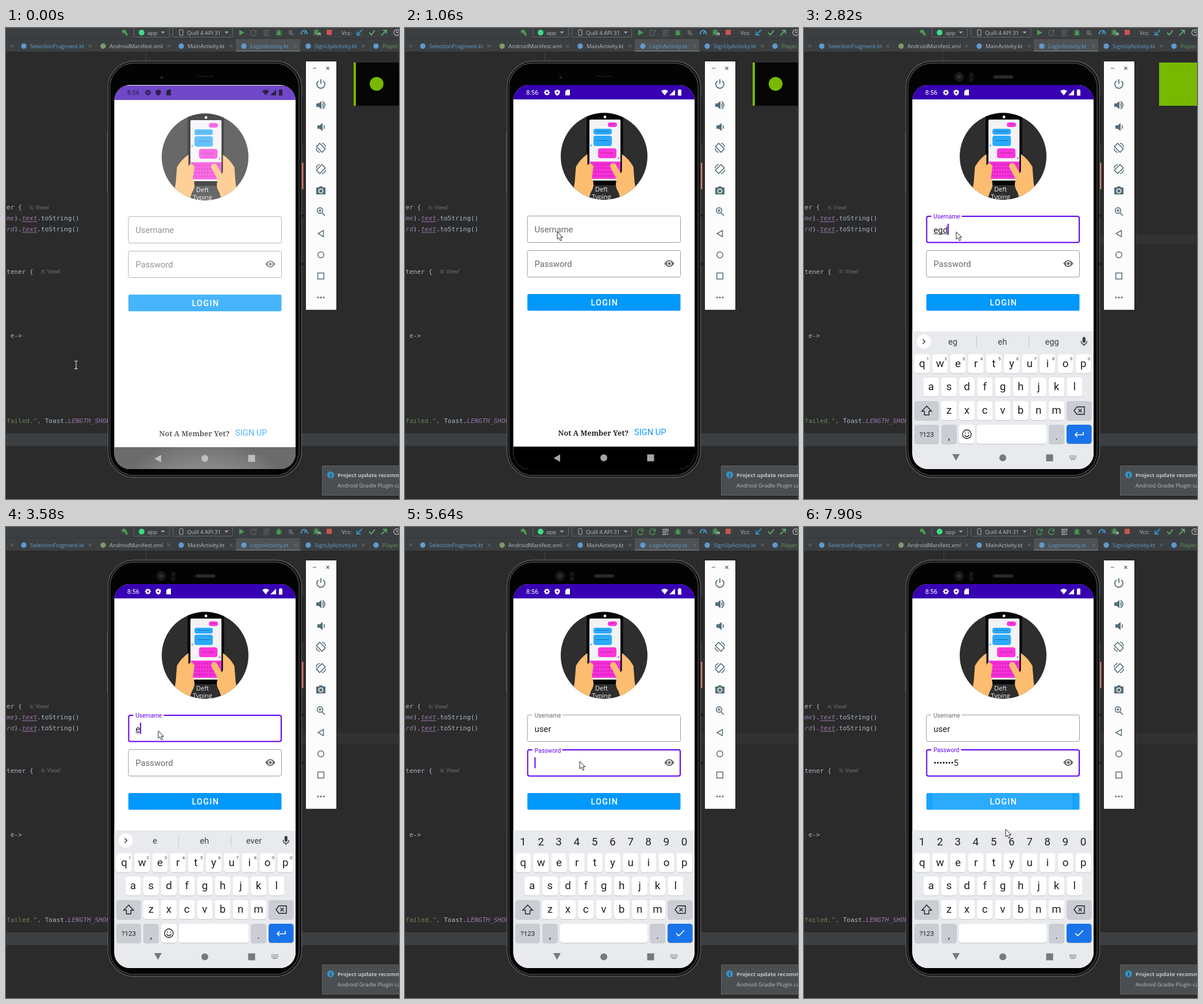
An HTML page with a canvas for the animation above (8000 ms loop, 684 by 818 pixels).

```html
<!DOCTYPE html>
<html lang="en">
<head>
<meta charset="utf-8">
<title>Login screen</title>
<style>
html, body { margin: 0; width: 100%; height: 100%; overflow: hidden; background: #2b2b2b; }
canvas { display: block; }
</style>
</head>
<body>
<canvas id="c" width="684" height="818"></canvas>
<script>
const ctx = document.getElementById('c').getContext('2d');
const LOOP = 8000;
const UI = '"Open Sans", "Noto Sans", sans-serif';
const MONO = '"DejaVu Sans Mono", monospace';
const APP = 'Roboto, sans-serif';
const PURPLE = '#6200ee', SLATE = '#546e7a', GREEN = '#499c54', DIM = '#5e6163';

// ---- helpers ----
function rect(x, y, w, h, fill) {
  ctx.fillStyle = fill;
  ctx.fillRect(x, y, w, h);
}
function box(x, y, w, h, r, fill, stroke, lw = 1) {
  ctx.beginPath();
  ctx.roundRect(x, y, w, h, r);
  paint(fill, stroke, lw);
}
function disc(x, y, r, fill, stroke, lw = 1) {
  ctx.beginPath();
  ctx.arc(x, y, r, 0, 7);
  paint(fill, stroke, lw);
}
function paint(fill, stroke, lw) {
  if (fill) { ctx.fillStyle = fill; ctx.fill(); }
  if (stroke) { ctx.strokeStyle = stroke; ctx.lineWidth = lw; ctx.stroke(); }
}
function icon(x, y, d, fill, stroke, lw = 1.4, turn = 0) {
  const p = new Path2D(d);
  ctx.save();
  ctx.translate(x, y);
  ctx.rotate(turn);
  if (fill) { ctx.fillStyle = fill; ctx.fill(p); }
  if (stroke) { ctx.strokeStyle = stroke; ctx.lineWidth = lw; ctx.stroke(p); }
  ctx.restore();
}
function text(s, x, y, font, color, align = 'left', spacing = 0) {
  ctx.font = font;
  ctx.fillStyle = color;
  ctx.textAlign = align;
  ctx.letterSpacing = spacing + 'px';
  ctx.fillText(s, x, y);
  const w = ctx.measureText(s).width;
  ctx.letterSpacing = '0px';
  return w;
}
// Value of the last [time, value] key reached.
function at(keys, t) {
  let v = keys[0][1];
  for (const k of keys) if (t >= k[0]) v = k[1];
  return v;
}
const within = (t, a, b) => t >= a && t < b;

// ---- timeline ----
const nameKeys = [[0, ''], [2430, 'e'], [2670, 'eg'], [2820, 'egd'], [3460, 'eg'], [3580, 'e'],
  [3730, ''], [4280, 'u'], [4430, 'use'], [4550, 'user']];
const hintKeys = [[0, ''], [2550, 'e eh ever'], [2820, 'eg eh egg'], [2940, 'egd egg edge'],
  [3460, 'eg eh egg'], [3580, 'e eh ever'], [3850, ''], [4280, 'u up us'], [4430, 'us use up'],
  [4550, 'use used uses'], [4830, 'user users used']];
const passKeys = [[0, ''], [5940, 'a'], [6060, 'ab'], [6210, 'abc'], [6330, 'abc1'], [6450, 'abc123'],
  [6750, 'abc1234'], [6870, 'abc12345']];
// Pointer moves: start, end, steps, x, y
const moves = [[460, 1060, 6, 265, 354], [5100, 5100, 1, 268, 354], [5250, 5370, 2, 304, 407],
  [6600, 6600, 1, 304, 425], [6750, 6750, 1, 304, 453], [6870, 7230, 4, 335, 484], [7900, 7900, 1, 351, 525]];

function pointer(t) {
  let x = 122, y = 585;
  for (const [a, b, n, x1, y1] of moves) {
    if (t < a) break;
    const step = n > 1 ? Math.min(n, 1 + Math.floor((t - a) / (b - a) * (n - 1))) : 1;
    x += (x1 - x) * step / n;
    y += (y1 - y) * step / n;
  }
  return [x, y];
}

// ---- IDE ----
const ARROW = 'M-3.5-2L0 2L3.5-2Z', CROSS = 'M-2.5-2.5L2.5 2.5M2.5-2.5L-2.5 2.5';
const RELOAD = 'M3.5-3A5 5 0 1 0 4.5 2M4.5-5V-1H.5';

function bug(x, y, c) {
  ctx.beginPath();
  ctx.ellipse(x, y + 1, 3, 4, 0, 0, 7);
  paint(c);
  icon(x, y, 'M-5-3L-2-1M5-3L2-1M-5.5 1H5.5M-5 5L-2 3M5 5L2 3M-2-5L0-3L2-5', null, c, 1.1);
}
function toolbar(t) {
  rect(0, 0, 684, 19, '#3c3f41');
  icon(206, 8, 'M-5-2L-1-6L3-3L6 4L4 6L-1 0L-3 1Z', GREEN);
  box(222.5, -4, 62, 20, 3, '#3c3f41', '#646769');
  disc(236, 8, 5, '#3ddc84');
  text('app', 246, 12, '9.8px ' + UI, '#bbb');
  icon(273, 8, ARROW, '#9da0a2');
  box(290.5, -4, 104, 20, 3, '#3c3f41', '#646769');
  box(302, 3, 6, 10, 1, null, '#afb1b3');
  text('Quill 4 API 31', 315, 12, '9.6px ' + UI, '#bbb');
  icon(384, 8, ARROW, '#9da0a2');
  const running = t >= 4830;
  if (running) icon(410, 8, RELOAD, null, GREEN);
  else icon(410, 8, 'M-4-5L5 0L-4 5Z', GREEN);
  icon(431, 8, RELOAD, null, running ? GREEN : DIM);
  icon(453, 8, 'M-5-4H6M-5-1H6M-5 2H2M-5 5H2M4 2V6', null, running ? '#afb1b3' : DIM);
  bug(475, 8, GREEN);
  icon(497, 8, 'M-5-4H1V3L-2 5L-5 2ZM1 0L5 3L1 6Z', DIM);
  icon(519, 8, 'M-5 3A5.2 5.2 0 1 1 5 3M0 2L3-2', null, '#4a9fd0', 1.8);
  bug(540, 7, GREEN);
  icon(545, 11, 'M-3 2L2-2M2 2V-2H-2', null, '#afb1b3');
  rect(558, 3, 9, 9, '#c75450');
  text('Vcs:', 584, 12, '9.6px ' + UI, '#bbb');
  icon(615, 8, 'M5-5L-4 4M-4-2V4H2', null, '#3592c4', 1.8);
  icon(637, 8, 'M-5 0L-1 4L5-4', null, '#59a869', 2);
  icon(658, 8, 'M-5 5L4-4M4 2V-4H-2', null, '#59a869', 1.8);
  disc(680, 8, 5, null, '#afb1b3', 1.3);
  icon(680, 8, 'M0-3V0H3', null, '#afb1b3');
}
function tabs() {
  rect(0, 18, 684, 1, '#323232');
  rect(0, 19, 684, 22, '#3c3f41');
  rect(400, 19, 112, 22, '#4e5254');
  rect(400, 39, 112, 2, '#686d71');
  icon(10, 31.5, CROSS, null, '#777', 1);
  const blue = '#5f9fce', grey = '#bbb';
  const list = [[31, 'SelectionFragment.kt', blue, 146], [169, 'AndroidManifest.xml', grey, 283],
    [305, 'MainActivity.kt', grey, 392], [414, 'LoginActivity.kt', blue, 504],
    [526, 'SignUpActivity.kt', blue, 622], [644, 'Player.kt', '#629755', 720]];
  for (const [x, name, color, close] of list) {
    disc(x, 31.5, 4.7, name.endsWith('kt') ? '#5f9ad0' : '#7f9a6a');
    text(name, x + 11, 35, '9.55px ' + UI, color);
    icon(close, 31.5, CROSS, null, '#777', 1);
  }
}
function code() {
  const font = '11.08px ' + MONO, plain = '#a9b7c6', field = '#9876aa', it = 'italic ' + font;
  const run = (y, parts) => {
    let x = 1;
    for (const [s, color, f] of parts) x += text(s, x, y, f || font, color);
  };
  run(315, [['er {', plain]]);
  run(427, [['tener {', plain]]);
  text('it: View!', 41, 315, '9.5px ' + UI, '#787878');
  text('it: View!', 61, 426, '9.5px ' + UI, '#787878');
  [['me', 334], ['rd', 352.5]].forEach(([s, y]) => {
    run(y, [[s, field, it], [').', plain], ['text', field, it], ['.toString()', plain]]);
    rect(28, y + 2, 26, 1, field);
  });
  run(538, [[' e->', plain]]);
  run(686, [['failed."', '#6a8759'], [', ', '#cc7832'], ['Toast.', plain], ['LENGTH_SHORT', field, it]]);
}
function ide(t) {
  rect(0, 0, 684, 818, '#2b2b2b');
  rect(243, 42, 1, 20, '#424242');
  if (t >= 2430) rect(516, 358, 168, 18, '#323232');
  code();
  rect(0, 704, 684, 22, '#3c3f41');
  toolbar(t);
  tabs();
  box(550.5, 760.5, 150, 51, 0, '#4b4e50', '#5e6264');
  disc(565, 776, 6, '#3592c4');
  text('i', 565, 779.5, 'bold 9px ' + UI, '#2b2b2b', 'center');
  text('Project update recommended', 577, 780, 'bold 9.4px ' + UI, '#c4c4c4');
  text('Android Gradle Plugin can be', 577, 798, '9.5px ' + UI, '#bbb');
}
function overlayPanel(t) {
  if (t >= 3060) return;
  const x = at([[0, 605], [2670, 608], [2820, 618], [2940, 642]], t);
  const w = at([[0, 4], [2430, 40], [2550, 90]], t);
  rect(x, 60, 80, 75, '#060606');
  disc(645, 97, 12, '#76b900');
  rect(x, 60, w, 75, '#76b900');
}

// ---- emulator ----
function sidebar() {
  rect(521.5, 57, 54.5, 434, '#1c1c1c');
  rect(522, 58, 53, 431.5, '#fcfcfc');
  icon(537, 70, 'M-3 0H3', null, '#555', 1);
  icon(560, 70, CROSS, null, '#555', 1.1);
  const x = 548, s = SLATE;
  icon(x, 97, 'M-4-5A7 7 0 1 0 4-5M0-8V0', null, s, 1.8);
  const speaker = 'M-8-3H-4L1-7V7L-4 3H-8Z';
  icon(x, 134, speaker, s);
  icon(x, 134, 'M3-3Q5 0 3 3M3-6.5Q11 0 3 6.5', null, s, 1.7);
  icon(x + 2, 172, speaker, s);
  icon(x + 2, 172, 'M3-3Q5.5 0 3 3', null, s, 1.7);
  for (const [y, k] of [[208, 1], [245, -1]]) {
    icon(x, y, 'M-4-7H4V7H-4Z', null, s, 1.6, -k * Math.PI / 4);
    icon(x, y, k > 0 ? 'M2-8Q8-7 8-1M-8 1Q-8 7-2 8' : 'M-2-8Q-8-7-8-1M8 1Q8 7 2 8', null, s, 1.4);
  }
  icon(x, 282, 'M-8-5H-4L-2-7H2L4-5H8V7H-8Z', s);
  disc(x, 283, 3.6, s, '#fff', 1.5);
  disc(x - 1.5, 317, 4.8, null, s, 1.7);
  icon(x, 319, 'M2 2L7 7M-4-2H1M-1.5-4.5V.5', null, s, 1.7);
  icon(x, 357, 'M4.5-5.5V5.5L-5 0Z', null, s, 1.5);
  disc(x, 394, 5.3, null, s, 1.5);
  box(x - 5.3, 425.5, 10.6, 10.6, 0, null, s, 1.5);
  for (const dx of [-5, 0, 5]) disc(x + dx, 468, 1.6, s);
}
function shell(t) {
  rect(514, 234, 3.5, 46, '#d47c66');
  rect(515, 120, 2, 80, '#161616');
  rect(515, 324, 2, 4, '#000');
  rect(515, 408, 2, 4, '#000');
  rect(175.5, 182, 2, 104, '#444');
  box(177.5, 57.5, 337, 723, 46, '#111', '#5d5d5d', 1.3);
  box(181, 61, 329, 716, 42, '#030303', '#4a4a4a', 1.3);
  if (t >= 2550) {
    disc(270, 85, 7.5, '#191919', '#242424');
    disc(270, 85, 3, '#303030');
    box(287, 77, 8, 17, 4, '#111');
    disc(291, 81, 2, '#1d1d1d');
    disc(291, 90, 2, '#1d1d1d');
    box(329, 82, 35, 6, 3, '#222');
    for (let x = 333; x < 362; x += 4) rect(x, 83, 2, 4, '#333');
  } else {
    disc(271, 86, 2.5, '#222');
    for (let x = 334; x < 362; x += 4) rect(x, 83, 2, 2, '#292929');
  }
}

// ---- app ----
function statusIcons(c) {
  text('8:56', 211, 116, '11px ' + APP, c);
  cog(247, 112, 4.5, c);
  icon(265, 112, 'M0-5L4.5-3V0Q4 4 0 5.5Q-4 4-4.5 0V-3Z', c);
  disc(265, 112, 1.6, '#3700b3');
  icon(283, 112, 'M-1-5H4V5H-4V-2Z', c);
  icon(452, 112, 'M-6-2.5Q0-7 6-2.5L0 5Z', c);
  icon(465, 112, 'M5-5V5H-5Z', c);
  icon(478, 112, 'M-1.5-5.5H1.5V-4.5H3V5.5H-3V-4.5H-1.5Z', c);
}
function cog(x, y, r, c) {
  disc(x, y, r * .62, null, c, r * .45);
  for (let i = 0; i < 8; i++) {
    icon(x, y, `M0 ${-r * .7}V${-r * 1.12}`, null, c, r * .4, i * Math.PI / 4);
  }
}
function logo() {
  ctx.save();
  ctx.beginPath();
  ctx.arc(346.5, 223, 75.5, 0, 7);
  ctx.clip();
  rect(270, 147, 154, 152, '#2e2e2e');
  box(316, 140, 63.5, 133, 7, '#050505');
  disc(348, 154.5, 2.4, '#eee');
  box(321, 159, 54, 106, 2, '#f3f3f6');
  const pink = '#fb35dc', blue = '#2ba9fb';
  const bubbles = [[353, 164, 16, 8, pink], [328, 175, 32, 10, blue], [328, 187, 32, 18, blue], [336, 209, 32, 17, pink]];
  for (const [x, y, w, h, c] of bubbles) {
    box(x, y, w, h, 4, c);
    rect(x + 5, y + h / 2 - 1, w - 10, 1, '#0005');
  }
  disc(324, 204, 1.5, blue);
  disc(372, 226, 1.5, pink);
  rect(322, 232, 53, 30, pink);
  for (let r = 0; r < 4; r++) {
    for (let i = 0; i < 10; i++) rect(325 + i * 4.8, 235 + r * 6.5, 3.4, 4, '#e024c6');
  }
  const skin = '#fdbd70';
  const hand = 'M-30-4Q-42 4-50 18L-52 44L-58 84H-31L-24 62Q-16 50-22 38L-30 26Z';
  ctx.lineCap = 'round';
  for (const [k, thumb] of [[1, 'M-29 46L-25 18'], [-1, 'M-29 43L-15 17']]) {
    ctx.save();
    ctx.translate(347.5, 223);
    ctx.scale(k, 1);
    icon(0, 0, hand, skin);
    icon(0, 0, thumb, null, skin, 11);
    ctx.restore();
  }
  text('Deft', 342, 284, '11px ' + UI, '#f2f2f2', 'center');
  text('Typing', 342, 296.5, '11px ' + UI, '#f2f2f2', 'center');
  ctx.restore();
}
// Outlined input; rise is how far the label has floated.
function input(y, label, rise, focus) {
  if (focus) box(213.5, y + 1, 265.5, 45.5, 3, null, PURPLE, 2);
  else box(213, y + .5, 266.5, 46, 3, null, '#999');
  if (rise > .5) rect(221.5, y - 1, label === 'Username' ? 53 : 52, 4, '#fff');
  const size = 14.75 - 4.6 * rise;
  text(label, 225.5, y + 28.5 - 23.7 * rise, size + 'px ' + APP, focus ? PURPLE : '#6a6a6a');
}
function caret(x, y) {
  rect(x, y, 2, 19, PURPLE);
}
function form(t) {
  const font = '14.8px ' + APP, onPass = t >= 5520;
  const name = at(nameKeys, t), pass = at(passKeys, t);
  input(326, 'Username', at([[0, 0], [1330, .5], [1450, 1]], t), within(t, 1330, 5520));
  const w = text(name, 225.5, 355.5, font, '#1c1c1c');
  if (within(t, 1330, 5520)) {
    if (name) rect(225.5, 357, w, 1, '#333');
    if (!within(t, 2280, 2430) && !within(t, 4950, 5250)) caret(225.3 + w, 340);
  }
  input(386, 'Password', at([[0, 0], [5520, .5], [5640, .95], [5790, 1]], t), onPass);
  const shown = '•'.repeat(Math.max(0, pass.length - 1)) + pass.slice(-1);
  const pw = text(shown, 225.5, 415, font, '#1c1c1c');
  if (within(t, 5640, 7630)) caret(225.3 + pw, 400);
  icon(460, 409, 'M-8.8 0Q0-12 8.8 0Q0 12-8.8 0Z', '#6c6c6c');
  disc(460, 409, 3.3, '#6c6c6c', '#fff', 1.5);
  button(t);
}
function button(t) {
  ctx.save();
  box(213, 462, 266.5, 29, 2.5, '#0098fa');
  ctx.clip();
  if (t >= 7630) {
    rect(213, 462, 267, 29, 'rgba(255,255,255,.1)');
    disc(345, 477, at([[0, 50], [7750, 90], [7900, 122]], t), 'rgba(255,255,255,.08)');
  }
  ctx.restore();
  text('LOGIN', 347.3, 482.2, '500 14.3px ' + APP, '#fff', 'center', 1.3);
}

// ---- keyboard ----
function key(x, y, w, fill = '#fff') {
  box(x, y - 15.5, w, 33, 4.5, '#c3c5c9');
  box(x, y - 16.5, w, 33, 4.5, fill);
}
function keyRow(chars, x, y, sup) {
  [...chars].forEach((ch, i) => {
    const cx = x + i * 31.2;
    key(cx - 13.5, y, 27);
    text(ch, cx, y + 5.5, '18.8px ' + APP, '#202124', 'center');
    if (sup) text((i + 1) % 10, cx + 10, y - 6.5, '8px ' + APP, '#3c4043', 'center');
  });
}
function strip(t, y) {
  const ink = '#3c4043', words = at(hintKeys, t);
  disc(208.5, y, 12.3, '#fff');
  icon(208.5, y, words ? 'M-2-4L2 0L-2 4' : 'M2-4L-2 0L2 4', null, ink, 1.6);
  box(484.7, y - 8, 5.2, 10, 2.6, ink);
  icon(487.3, y, 'M-5-1Q-5 5 0 5Q5 5 5-1M0 5V8', null, ink, 1.5);
  if (words) {
    words.split(' ').forEach((s, i) => text(s, 259 + i * 86.3, y + 5.5, '14.6px ' + APP, ink, 'center'));
    rect(300, y - 10, 1, 20, '#c6c8cc');
    rect(391, y - 10, 1, 20, '#c6c8cc');
    return;
  }
  icon(250, y, 'M-6-6H6V2L2 6H-6ZM6 2H2V6M-3 0Q0 4 3 0M-3-3V-2M3-3V-2', null, ink, 1.5);
  text('GIF', 295, y + 4, 'bold 11px ' + APP, ink, 'center', .4);
  icon(341, y, 'M-5.5-6H5.5V7H-5.5ZM-2-8H2V-4H-2ZM-3-1H3M-3 2H3M-3 4.5H1', null, ink, 1.4);
  cog(386, y, 6.2, ink);
  rect(414, y - 10, 1, 20, '#c6c8cc');
  for (const dx of [-5, 0, 5]) disc(442.5 + dx, y, 1.7, ink);
}
function keyboard(t) {
  const off = t < 1850 ? 9 : 0, secret = t >= 5640, grey = '#cbcdd4', ink = '#202124';
  rect(188, 527 + off, 317, 245, '#e8eaed');
  if (secret) {
    [...'1234567890'].forEach((d, i) => text(d, 205.3 + i * 31.2, 552.5, '19px ' + APP, ink, 'center'));
  } else strip(t, 544.5 + off);
  const y = 583 + off, y3 = y + 81.5, y4 = y + 122.5;
  keyRow('qwertyuiop', 205.5, y, !secret);
  keyRow('asdfghjkl', 221.2, y + 40.5);
  keyRow('zxcvbnm', 252.3, y3);
  key(192, y3, 43, grey);
  icon(213.5, y3, 'M0-8L8.5 1H4V7.5H-4V1H-8.5Z', null, ink);
  key(457, y3, 43.5, grey);
  icon(479, y3, 'M-9 0L-4-6.5H9V6.5H-4ZM-1.5-3L4.5 3M4.5-3L-1.5 3', null, ink);
  key(192, y4, 43, grey);
  text('?123', 213.5, y4 + 4.5, '11.7px ' + APP, ink, 'center');
  key(239, y4, 27, grey);
  text(',', 252.5, y4 + 9, '17px ' + APP, ink, 'center');
  if (!secret) {
    key(270, y4, 27);
    disc(283.5, y4, 7.5, null, ink, 1.4);
    icon(283.5, y4, 'M-4 1.5Q0 7 4 1.5M-2.8-3V-1M2.8-3V-1', null, ink);
  }
  key(secret ? 270 : 301, y4, secret ? 152 : 121);
  key(426, y4, 27, grey);
  text('.', 439.5, y4 + 9, '17px ' + APP, ink, 'center');
  key(457, y4, 43.5, '#1a73e8');
  icon(479, y4, secret ? 'M-7 0L-2.5 4.5L7-5' : 'M7-4V1H-7M-3-3.5L-7 1L-3 5', null, '#fff', 1.7);
}
function navBack(t) {
  if (t >= 150) return '#000';
  const g = ctx.createRadialGradient(346, 900, 130, 346, 900, 190);
  g.addColorStop(0, '#626262');
  g.addColorStop(1, '#333');
  return g;
}
function navBar(t) {
  const open = t >= 1730, c = open ? '#77797c' : '#a5a5a5';
  if (!open) rect(188, 727, 317, 45, navBack(t));
  const turn = at([[0, 0], [1730, Math.PI], [1850, -Math.PI / 2]], t);
  icon(within(t, 1730, 1850) ? 266 : 264.5, open ? 745.5 : 747, 'M-6 0L5.5-6.5V6.5Z', c, null, 1, turn);
  disc(346, 746.5, 6, c);
  rect(421.5, 740.5, 12, 12, c);
  if (!open) return;
  for (let r = 0; r < 2; r++) for (let i = 0; i < 5; i++) rect(462 + i * 2.6, 742.5 + r * 3, 1.6, 1.8, c);
  rect(464, 748.5, 8, 1.3, c);
}
function screen(t) {
  const entering = t < 150;
  ctx.save();
  ctx.beginPath();
  ctx.roundRect(188.5, 99, 315.5, 667, 27);
  ctx.clip();
  rect(188, 98, 317, 670, '#fff');
  ctx.save();
  if (entering) ctx.translate(0, 1);
  rect(188, 99, 317, 25, '#3700b3');
  logo();
  form(t);
  text('Not A Member Yet?', 266.5, 707.5, 'bold 12.6px "Noto Serif", serif', '#222');
  text('SIGN UP', 399, 707.3, '14.7px ' + APP, '#0e98f8');
  if (t >= 1730) keyboard(t);
  navBar(t);
  ctx.restore();
  const veil = at([[0, .28], [150, .05], [310, 0]], t);
  if (veil) rect(188, 98, 317, 670, `rgba(255,255,255,${veil})`);
  statusIcons(entering ? '#2a2140' : '#fff');
  ctx.restore();
}

function drawPointer(t) {
  const [x, y] = pointer(t);
  if (x < 176) icon(x, y, 'M-3-7Q0-7 0-5Q0-7 3-7M0-5.5V5.5M-3 7Q0 7 0 5Q0 7 3 7', null, '#ddd', 1.1);
  else icon(x, y, 'M0 0V13L3 10.3L5.3 15.5L7.7 14.5L5.5 9.5H9.5Z', '#fff', '#222', 1);
}

function frame() {
  const t = performance.now() % LOOP;
  ide(t);
  overlayPanel(t);
  shell(t);
  screen(t);
  sidebar();
  drawPointer(t);
  requestAnimationFrame(frame);
}
frame();
</script>
</body>
</html>
```
